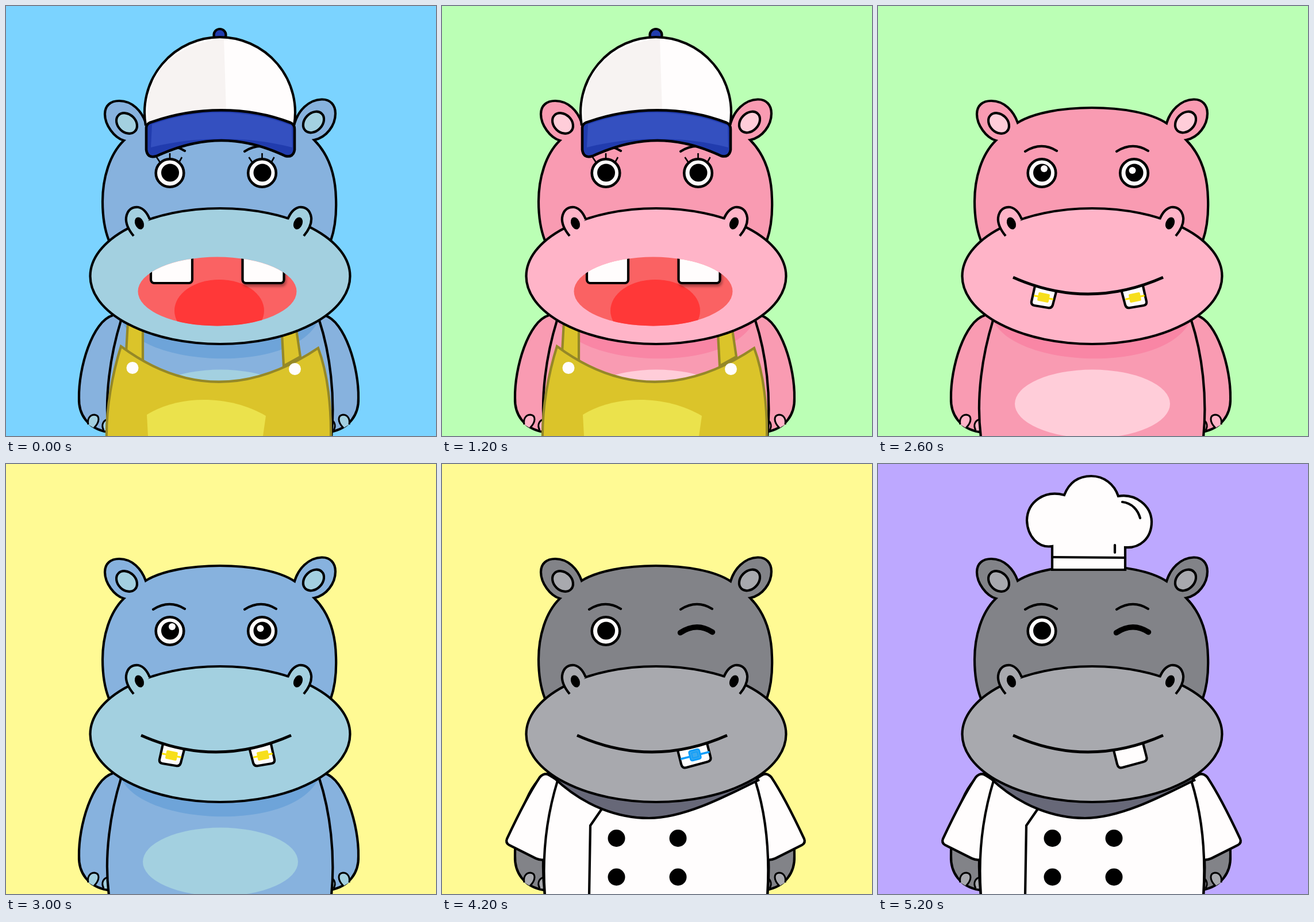
Write an HTML page that moves like this. It is 748 px wide and 748 px high and loops after 5400 ms.

```html
<!DOCTYPE html>
<html lang="en">
<head>
<meta charset="utf-8">
<title>Hippo wardrobe</title>
<style>
  html, body { margin: 0; height: 100%; overflow: hidden; }
  svg { display: block; width: 100vw; height: 100vh; background: var(--bg);
        stroke: #000; stroke-width: 4.2; fill: none; }
  .main { fill: var(--main); }
  .light { fill: var(--light); }
  .pale { fill: var(--pale); }
  .shade { fill: var(--shade); }
  .white { fill: #fffdfd; }
  .black { fill: #000; }
  .flat { stroke: none; }
  .round { stroke-linecap: round; }
  .denim { fill: #dbc42a; stroke: #958827; }
  .tee { fill: #54aefb; stroke: #0a89f5; }
  .gold { stroke: #ffe300; }
</style>
</head>
<body>
<svg viewBox="0 0 748 748">
  <defs>
    <clipPath id="gape"><ellipse cx="367.5" cy="496.5" rx="138" ry="60"/></clipPath>
    <g id="arm">
      <path class="main" d="M186 538C150 548 126 630 127 682C126 710 142 735 176 741L200 547"/>
      <g class="light" stroke-width="3">
        <path d="M143 728C141 718 146 711 154 711C163 712 164 723 153 734"/>
        <path d="M170 738C165 729 169 720 178 719V739"/>
      </g>
    </g>
    <g id="nostril">
      <path class="light" d="M222 400C212 388 208 378 209 368C211 354 220 349 230 350C240 352 246 361 250 371"/>
      <ellipse class="black flat" cx="232" cy="378" rx="7.5" ry="11" transform="rotate(-22 232 378)"/>
    </g>
    <path id="sleeve" d="M204 552L186 541Q178 536 170 545C148 578 128 620 113 652Q110 659 117 663L163 686Q172 690 178 688"/>
    <path id="shirt" d="M201 551C186 600 173 670 179 750H566C571 670 562 605 545 551"/>
    <g id="eye">
      <circle class="white" cx="285" cy="290.5" r="24.3" stroke-width="4.6"/>
      <circle class="black flat" cx="285.5" cy="290" r="15.5"/>
    </g>
    <path id="lashes" stroke-width="2.6" d="M285 265V256M268 272L262 263M301 272L306 263"/>
    <path id="brow" class="round" d="M256 253Q284 235.5 311 252"/>
    <path id="tooth" class="white" d="M273 487L267 514Q266 520 272 521L296 525Q302 526 304 520L310 497"/>
    <g id="stud" class="gold" transform="rotate(11 288 507)">
      <path stroke-width="3" d="M271 507H305"/>
      <rect x="278" y="499.5" width="20" height="15" rx="2" fill="#f7df1c" stroke="none"/>
    </g>
    <g id="lens">
      <circle class="black" cx="285" cy="280" r="46.5" stroke-width="9"/>
      <path stroke="#aaa" stroke-width="4" d="M294 305L311 291M297 316L320 294"/>
    </g>
  </defs>

  <use href="#arm"/>
  <use href="#arm" transform="matrix(-1 0 0 1 740 0)"/>
  <path class="main" d="M200 547C182 605 170 680 179 750H566C573 680 564 605 545 547"/>
  <path class="shade flat" d="M201 548C240 630 500 640 543 548"/>
  <ellipse class="pale flat" cx="373" cy="692" rx="135" ry="59.5"/>

  <g data-wear="overalls">
    <path class="denim" d="M212 550L238 560V622L209 602Z"/>
    <path class="denim" d="M480 570L505 563L512 610L483 626Z"/>
    <path class="denim" d="M200 592Q365 714 543 595C560 640 566 700 565 752H175C174 700 185 640 200 592Z"/>
    <path fill="#ebe24c" class="flat" d="M245 711C300 676 390 676 452 713L447 748H247Z"/>
    <circle class="white flat" cx="220" cy="629.5" r="10.5"/>
    <circle class="white flat" cx="502.5" cy="631.5" r="10.5"/>
  </g>
  <g data-wear="coat">
    <g class="white">
      <use href="#sleeve"/>
      <use href="#sleeve" transform="matrix(-1 0 0 1 743 0)"/>
      <use href="#shirt"/>
    </g>
    <path class="shade" d="M195 546C250 598 310 616 360 616C420 616 490 580 552 549"/>
    <path d="M278 600L258 629L256 750"/>
    <g class="black flat">
      <circle cx="303.5" cy="651" r="15"/><circle cx="410.5" cy="651" r="15"/>
      <circle cx="303.5" cy="718.5" r="15"/><circle cx="410.5" cy="718.5" r="15"/>
    </g>
  </g>
  <g data-wear="tee">
    <g class="tee">
      <use href="#sleeve" y="-3"/>
      <use href="#sleeve" y="-3" transform="matrix(-1 0 0 1 744 0)"/>
      <use href="#shirt"/>
    </g>
    <path class="shade flat" d="M200 550C250 585 310 612 365 612S490 590 545 549"/>
    <path fill="#0a89f5" class="flat" d="M192 546L196 571C260 603 310 619 365 619C430 619 500 596 554 571L548 548C490 587 430 608 365 608C320 608 280 585 200 546Z"/>
  </g>

  <path class="main" d="M179 408C170 385 168 360 168 340C168 300 180 258 205 234C188 229 172 207 172 188C172 173 182 165 197 165C220 165 236 183 243 203C270 186 320 177 372 177C425 177 475 186 502 204C508 183 526 163 549 162.5C564 162 573 172 573 187C573 208 557 229 536 233C560 257 573 290 574 335C575 360 573 385 565 408"/>
  <ellipse class="pale" cx="210" cy="204" rx="15.5" ry="20" transform="rotate(-46 210 204)"/>
  <ellipse class="pale" cx="535" cy="202" rx="15.5" ry="20.5" transform="rotate(44 535 202)"/>
  <ellipse class="light" cx="372.5" cy="470" rx="226" ry="118"/>
  <use href="#nostril"/>
  <use href="#nostril" transform="matrix(-1 0 0 1 740 0)"/>

  <use href="#brow"/>
  <use href="#brow" x="159"/>
  <use href="#eye" data-eyes="plain lash shine wink"/>
  <use href="#eye" x="160.5" data-eyes="plain lash shine"/>
  <g data-eyes="lash"><use href="#lashes"/><use href="#lashes" x="160.5"/></g>
  <g data-eyes="shine" class="white flat">
    <circle cx="289" cy="283" r="6"/><circle cx="442.5" cy="286" r="6"/>
  </g>
  <path data-eyes="wink" class="round" stroke-width="9.5" d="M414.5 293.5Q443 274.5 470.5 292.5"/>
  <g data-eyes="shades" class="gold">
    <path stroke-width="9.5" d="M189 249L240 278M488 278L543 249"/>
    <path stroke-width="12.5" d="M330 274.5H400"/>
    <use href="#lens"/>
    <use href="#lens" x="158"/>
  </g>

  <g data-mouth="open" clip-path="url(#gape)">
    <rect x="220" y="430" width="300" height="130" fill="#fa6263" class="flat"/>
    <ellipse cx="371" cy="530" rx="78" ry="54" fill="#ff3838" class="flat"/>
    <rect class="white" x="252" y="410" width="72" height="72" rx="6"/>
    <rect class="white" x="411.5" y="410" width="72" height="72" rx="6" style="filter:drop-shadow(2px 4px 2px #0005)"/>
  </g>
  <g data-mouth="two gold">
    <use href="#tooth"/><use href="#tooth" transform="matrix(-1 0 0 1 734 0)"/>
  </g>
  <g data-mouth="gold">
    <use href="#stud"/><use href="#stud" transform="matrix(-1 0 0 1 735 0)"/>
  </g>
  <path data-mouth="one blue" class="white" d="M410 498L416 522Q418 530 425 528L462 518Q469 516 467 509L461 486"/>
  <g data-mouth="blue" stroke="#0d9dfa" transform="rotate(-14 440 506)">
    <path stroke-width="3.5" d="M414 507H466"/>
    <rect x="431" y="497.5" width="18" height="17" rx="3" fill="#3aa9ee" stroke-width="3"/>
    <rect x="435" y="501.5" width="10" height="9" stroke-width="1.5"/>
  </g>
  <path data-mouth="two gold one blue" stroke-width="5" d="M235 472Q365 530 496 472"/>

  <g data-hat="cap">
    <circle cx="372" cy="50.5" r="10.5" fill="#213cae"/>
    <path class="white" d="M243 208A131 131 0 1 1 501 208"/>
    <path fill="#f7f3f2" class="flat" d="M379 57L383 184C340 182 290 190 248 200C238 150 265 67 379 57Z"/>
    <path fill="#213cae" stroke-width="4.6" d="M250 203C330 174 420 174 495 203Q502 206 502 214V250Q500 264 486 261C410 225 340 225 262 261Q246 266 244 250V212Q244 206 250 203Z"/>
    <path fill="#3450c0" class="flat" d="M254 206C330 178 418 178 497 208L498 246C420 226 330 226 252 246Z"/>
  </g>
  <g data-hat="cowboy" class="flat" fill="#d78b37">
    <ellipse cx="366.5" cy="208.5" rx="246.5" ry="43"/>
    <path d="M228 172C242 145 246 110 247 90C249 55 280 34 316 45C350 56 385 56 412 46C445 33 478 50 484 85C487 115 494 145 504 174Z"/>
    <path fill="#a94a00" d="M220 187H510L515 202C420 212 300 212 212 202Z"/>
  </g>
  <g data-hat="toque">
    <path class="white" d="M303 184V143C278 147 260 125 259 98C260 65 290 45 324 54C333 31 350 21 371 21C393 21 411 35 418 56C448 51 475 72 476 100C476 130 455 147 430 145V184Z"/>
    <path d="M303 162L430 163"/>
    <path class="round" d="M425 66C442 68 452 80 456 94M412 141V154"/>
  </g>
</svg>
<script>
  const backdrops = { blue: '#7bd3ff', purple: '#bda8ff', green: '#bbffb5', yellow: '#fffa94' };
  const skins = {
    blue:  { main: '#87b2de', light: '#a3d0e0', pale: '#a3d0e0', shade: '#6ea4d9' },
    brown: { main: '#a5888c', light: '#cbafb3', pale: '#cbafb3', shade: '#8b6e73' },
    pink:  { main: '#f99bb2', light: '#ffb4c8', pale: '#ffcdd9', shade: '#f986a5' },
    grey:  { main: '#828388', light: '#a8a9ae', pale: '#a8a9ae', shade: '#676878' }
  };

  // Each step swaps a few traits and keeps the rest.
  const steps = [
    { bg: 'blue', skin: 'blue', hat: 'cap', eyes: 'lash', mouth: 'open', wear: 'overalls' },
    { skin: 'grey' }, { skin: 'pink' }, { skin: 'brown' }, { bg: 'purple' },
    { bg: 'green' }, { skin: 'pink' }, { hat: 'cowboy' }, { mouth: 'two' }, { eyes: 'plain' },
    { hat: 'none' }, { wear: 'none' }, { eyes: 'shine' }, { mouth: 'gold' },
    { bg: 'yellow' }, { skin: 'blue' }, { hat: 'cap', wear: 'coat' }, { eyes: 'shades' }, { mouth: 'blue' },
    { skin: 'grey' }, { hat: 'none' }, { eyes: 'wink' }, { mouth: 'open' }, { wear: 'tee' },
    { bg: 'purple', mouth: 'one' }, { wear: 'coat' }, { hat: 'toque' }
  ];
  const stepTime = 200;
  const svg = document.querySelector('svg');
  let shown = -1;

  function dress(index) {
    const look = Object.assign({}, ...steps.slice(0, index + 1));
    const colours = { bg: backdrops[look.bg], ...skins[look.skin] };
    for (const name in colours) svg.style.setProperty('--' + name, colours[name]);
    for (const trait of ['hat', 'eyes', 'mouth', 'wear']) {
      for (const part of svg.querySelectorAll(`[data-${trait}]`)) {
        const worn = part.dataset[trait].split(' ').includes(look[trait]);
        part.style.display = worn ? '' : 'none';
      }
    }
  }

  function tick() {
    const index = Math.floor(performance.now() / stepTime) % steps.length;
    if (index !== shown) dress(shown = index);
    requestAnimationFrame(tick);
  }
  tick();
</script>
</body>
</html>
```
